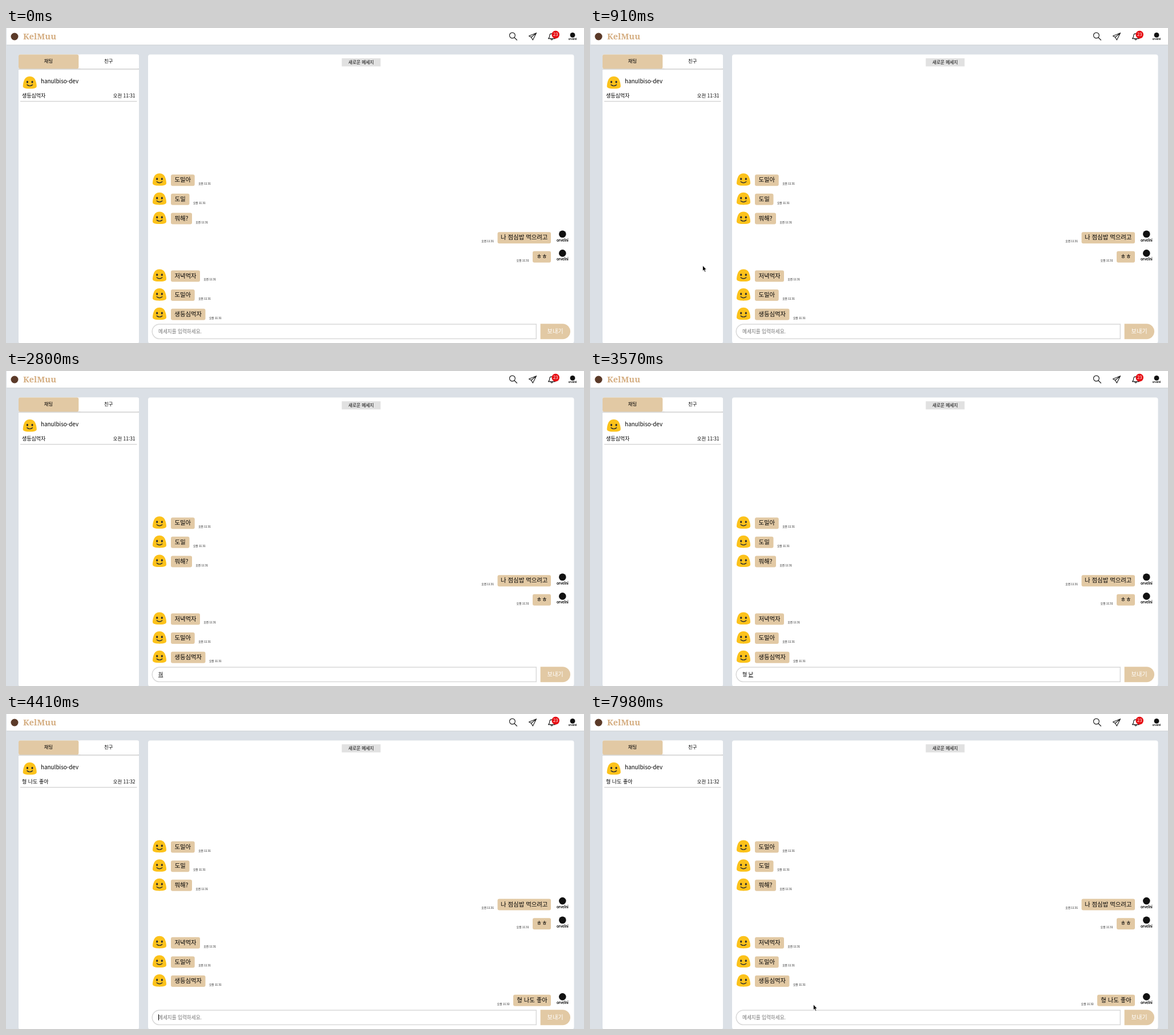
These frames come from a looping animation (1013 by 553 pixels, 8000 ms). An HTML page:

```html
<!DOCTYPE html>
<html lang="ko">
<head>
<meta charset="utf-8">
<title>Chat</title>
<style>
  html, body { margin: 0; width: 100%; height: 100%; overflow: hidden; background: #dbe0e6; }
  svg { display: block; width: 1013px; height: 553px; }
  text { font-family: "Noto Sans CJK KR", "Noto Sans CJK", "Noto Sans", sans-serif; white-space: pre; }
  .brand { font-family: "Noto Serif", serif; font-weight: 900; }
  .mark { font-family: Lato, sans-serif; font-weight: 700; }
  .icon { fill: none; stroke: #222; stroke-width: 1.2; stroke-linejoin: round; stroke-linecap: round; }
</style>
</head>
<body>
<svg id="stage" viewBox="0 0 1013 553">
  <defs>
    <g id="face">
      <path fill="#fcc21b" d="M0-11C6.6-11 9.4-6.6 10.8-1.5C11.7 1.8 12 4.5 12 6.2C12 9.8 6 10.6 0 10.6S-12 9.8-12 6.2C-12 4.5-11.7 1.8-10.8-1.5C-9.4-6.6-6.6-11 0-11Z"/>
      <g fill="#2f2f2f"><ellipse cx="-4.3" cy="-1.2" rx="1.6" ry="2.1"/><ellipse cx="4.3" cy="-1.2" rx="1.6" ry="2.1"/></g>
      <path d="M-4.8 3.6Q0 7.6 4.8 3.6" fill="none" stroke="#2f2f2f" stroke-width="1.4" stroke-linecap="round"/>
    </g>
    <g id="badge">
      <circle r="6.3" fill="#111"/>
      <text class="mark" y="13" font-size="6.8" text-anchor="middle">orvelni</text>
    </g>
  </defs>
</svg>
<script>
const TAN = '#e2c9a4', ROW = 33.65;
const stage = document.getElementById('stage');

const rect = (x, y, w, h, fill, r = 0, extra = '') =>
  `<rect x="${x}" y="${y}" width="${w}" height="${h}" rx="${r}" fill="${fill}" ${extra}/>`;
const text = (x, y, size, str, anchor = 'start', fill = '#000', extra = '') =>
  `<text x="${x}" y="${y}" font-size="${size}" text-anchor="${anchor}" fill="${fill}" ${extra}>${str}</text>`;
const use = (id, x, y, scale = 1) =>
  `<use href="#${id}" transform="translate(${x} ${y}) scale(${scale})"/>`;

// Each message: text, bubble width, minute, sent by me
const messages = [
  ['도밀아', 41.7, 31], ['도밀', 32.5, 31], ['뭐해?', 37, 31],
  ['나 점심밥 먹으려고', 93.5, 31, true], ['ㅎㅎ', 32, 31, true],
  ['저녁먹자', 51, 31], ['도밀아', 41.7, 31], ['생등심먹자', 60.5, 31],
  ['형 나도 좋아', 66, 32, true]
];

function message([str, width, minute, mine], i) {
  const y = 257.2 + ROW * i, x = mine ? 955 - width : 289;
  return `<g id="m${i}">` + rect(x, y, width, 20, TAN, 3) +
    text(x + width / 2, y + 13.2, 10.4, str, 'middle') +
    text(mine ? x - 6.5 : x + width + 6.5, y + 18, 4.7, '오전 11:' + minute, mine ? 'end' : 'start') +
    (mine ? use('badge', 975.3, y + 3.6) : use('face', 269, y + 9)) + '</g>';
}

stage.insertAdjacentHTML('beforeend',
  // Header
  rect(1, 0, 1012, 29.5, '#fff') + rect(1, 29.5, 1012, 1, '#cfd3d8') +
  '<circle cx="15" cy="15" r="6.5" fill="#5b3a29"/>' +
  text(30, 20.3, 14.8, 'KelMuu', 'start', '#d5ae82', 'class="brand"') +
  `<g class="icon">
    <circle cx="887.4" cy="13" r="4.9"/><path d="M891 16.8L895.5 21.2"/>
    <path d="M929.5 8.7L916.5 14L920.5 16.2L923.3 21ZL920.5 16.2"/>
    <path d="M950.5 18.7Q952.7 17 952.7 13.5Q952.8 9.8 956.5 9.8Q960.2 9.8 960.3 13.5Q960.4 17 962.5 18.7ZM954.8 19.2Q956.5 22.5 958.2 19.2"/>
  </g>` +
  '<circle cx="963.2" cy="11.6" r="6.8" fill="#e60d12"/>' +
  text(963.2, 14.4, 7.6, '23', 'middle', '#fff') + use('badge', 993, 12.4, .7) +
  // Sidebar
  rect(22, 46.5, 211, 507, '#fff', 3) + rect(22, 71, 211, 2.2, '#d8d8d8') +
  rect(22, 46.5, 105.3, 25, TAN, 3) + rect(128, 46.5, 105, 24.8, '#fff', 3) +
  text(74.4, 61.3, 8.4, '채팅', 'middle') + text(179.8, 61.3, 8.4, '친구', 'middle') +
  use('face', 41.7, 96) + text(61, 96.5, 9.9, 'hanulbiso-dev') +
  text(28, 121.8, 9, '', 'start', '#000', 'id="preview"') +
  text(226.5, 121.8, 8.4, '', 'end', '#000', 'id="stamp"') +
  rect(25, 128, 204.5, 1.4, '#d4d4d4') +
  // Chat
  rect(249, 46.5, 746.5, 507, '#fff', 4) +
  rect(588.5, 53.2, 68, 14.2, '#e1e1e1') + text(622.4, 62.6, 7.7, '새로운 메세지', 'middle') +
  '<g id="list">' + messages.map(message).join('') + '</g>' +
  '<path d="M929.3 520V545.6H269A12.8 12.8 0 0 1 269 520Z" fill="#fff" stroke="#d9d9d9" stroke-width="1.5"/>' +
  `<path d="M936.6 519.2H975.5A13.5 13.5 0 0 1 975.5 546.2H936.6Z" fill="${TAN}"/>` +
  text(962.6, 536.2, 10.2, '보내기', 'middle', '#fff') +
  text(267, 535.8, 8.6, '메세지를 입력하세요.', 'start', '#757575', 'id="hint"') +
  text(267, 535.8, 9, '<tspan id="done"></tspan><tspan id="open" text-decoration="underline"></tspan>', 'start', '#000', 'id="typed"') +
  rect(267, 527.3, 1, 10.4, '#000', 0, 'id="caret"') +
  // Pointer
  '<g id="pointer"><circle id="click" fill="#808080" fill-opacity=".35"/>' +
  '<path id="arrow" d="M0 0V9.6L2.1 7.7L3.7 11.2L5.3 10.5L3.8 7.1H6.7Z" fill="#000" stroke="#fff" stroke-width=".7"/>' +
  '<path id="beam" d="M-2.2-5.2Q0-5.2 0-4Q0-5.2 2.2-5.2M0-4V4M-2.2 5.2Q0 5.2 0 4Q0 5.2 2.2 5.2M-1.1.9H1.1" fill="none" stroke="#111" stroke-width="1.1"/></g>'
);

const el = Object.fromEntries([...stage.querySelectorAll('[id]')].map(n => [n.id, n]));
const show = (node, on) => node.setAttribute('visibility', on ? 'visible' : 'hidden');

// Time, committed text, syllable being composed
const typing = [
  [0, '', ''], [2520, '', 'ㅎ'], [2800, '', '혀'], [3010, '', '형'], [3150, '형 ', ''],
  [3430, '형 ', 'ㄴ'], [3500, '형 ', '나'], [3570, '형 ', '낟'], [3640, '형 나', '도'],
  [3710, '형 나도 ', ''], [3780, '형 나도 ', 'ㅈ'], [3850, '형 나도 ', '조'],
  [3990, '형 나도 ', '좋'], [4130, '형 나도 좋', '아'], [4270, '', '']
];
const caretToggles = [1820, 2380, 3150, 3430, 3710, 3780, 4270, 4830, 5320, 5880, 6370, 6930, 7420, 7980];
// Pointer moves: begin, end, x, y
const moves = [
  [70, 490, 216, 420], [560, 700, 197.5, 417], [1260, 1680, 381, 530.8],
  [1960, 2100, 376.5, 520.5], [4830, 4970, 391.5, 510]
];

function pointerAt(t) {
  let x = 433, y = 541;
  for (const [begin, end, toX, toY] of moves) {
    const k = Math.min(1, Math.max(0, (t - begin) / (end - begin)));
    const ease = k * k * (3 - 2 * k);
    x += (toX - x) * ease;
    y += (toY - y) * ease;
  }
  return [x, y];
}

function clickRadius(t) {
  if (t >= 700 && t < 910) return t < 770 ? 12 : 16;
  return t >= 1820 && t < 1890 ? 12 : 0;
}

function draw(now) {
  const t = Math.floor(now % 8000 / 70) * 70;

  const sent = t >= 4410;
  el.list.setAttribute('transform', `translate(0 ${sent ? -ROW : 0})`);
  show(el.m8, sent);
  el.preview.textContent = sent ? '형 나도 좋아' : '생등심먹자';
  el.stamp.textContent = '오전 11:' + (sent ? 32 : 31);

  const [, done, open] = typing.findLast(step => step[0] <= t);
  el.done.textContent = done;
  el.open.textContent = open;
  show(el.hint, !done && !open);
  show(el.caret, caretToggles.filter(at => at <= t).length % 2);
  el.caret.setAttribute('x', 267 + (done ? el.typed.getComputedTextLength() : 0));

  const [x, y] = pointerAt(t);
  const visible = t >= 70 && t < 2520 || t >= 4830;
  const overInput = x > 256 && x < 930 && y > 519 && y < 546;
  el.pointer.setAttribute('transform', `translate(${x} ${y})`);
  el.click.setAttribute('r', clickRadius(t));
  show(el.arrow, visible && !overInput);
  show(el.beam, visible && overInput);

  requestAnimationFrame(() => draw(performance.now() - start));
}
const start = performance.now();
draw(0);
</script>
</body>
</html>
```
